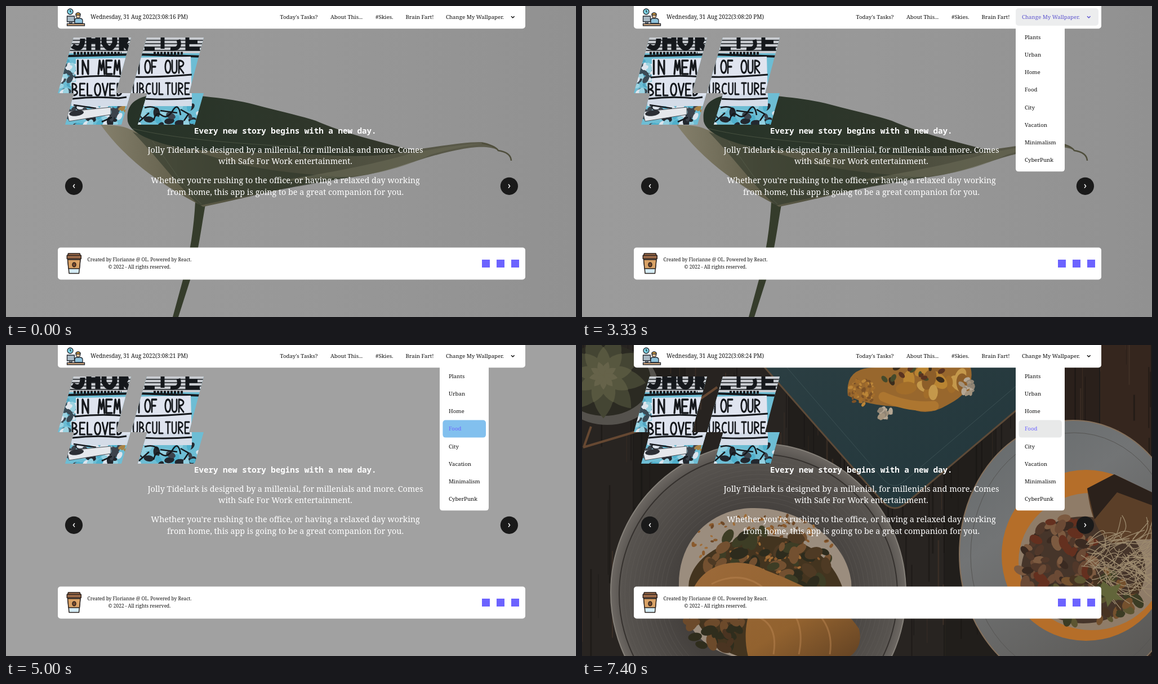
Recreate the animation shown at these times as an HTML page. Size 1012x553 px, loop 8000 ms.

```html
<!DOCTYPE html>
<html lang="en">
<head>
<meta charset="utf-8">
<title>Wallpaper menu</title>
<style>
html, body { margin: 0; width: 100%; height: 100%; overflow: hidden; background: #a1a1a1; }
svg { display: block; width: 1012px; height: 553px; }
text { font-family: "Noto Serif", serif; font-size: 9.7px; fill: #111; white-space: pre; }
.title { font: bold 14.2px "Noto Sans Mono", monospace; fill: #fff; }
.lead { font-size: 14.35px; fill: #fff; text-anchor: middle; }
.foot { font-size: 8.4px; text-anchor: middle; }
#clock { font-size: 9.9px; }
.ink { fill: none; stroke: #15181c; }
</style>
</head>
<body>
<svg viewBox="0 0 1012 553">
<defs>
  <linearGradient id="wall"><stop stop-color="#9b9b9b"/><stop offset=".5" stop-color="#989898"/><stop offset="1" stop-color="#919191"/></linearGradient>
  <linearGradient id="under"><stop stop-color="#85806c"/><stop offset=".2" stop-color="#625f4b"/><stop offset=".45" stop-color="#464838"/><stop offset="1" stop-color="#5d5c4c"/></linearGradient>
  <linearGradient id="top"><stop stop-color="#263227"/><stop offset=".4" stop-color="#2c362a"/><stop offset="1" stop-color="#34372b"/></linearGradient>
  <linearGradient id="slate" x2="1" y2="1"><stop stop-color="#2c3f43"/><stop offset="1" stop-color="#22363b"/></linearGradient>
  <radialGradient id="plate"><stop offset=".55" stop-color="#45413e"/><stop offset=".92" stop-color="#57534f"/><stop offset="1" stop-color="#6d6863"/></radialGradient>
  <linearGradient id="bowl" x2=".6" y2="1"><stop stop-color="#64696b"/><stop offset=".4" stop-color="#727475"/><stop offset="1" stop-color="#5b5956"/></linearGradient>
  <linearGradient id="fish" x2="1" y2="1"><stop stop-color="#9c6a3a"/><stop offset=".6" stop-color="#92622f"/><stop offset="1" stop-color="#5e3f22"/></linearGradient>
  <clipPath id="hash"><path d="M120 56H222L195 155H92zM250 56H351L325 155H222zM121 155H221L205 211H105zM251 155H351L335 211H234z"/></clipPath>
</defs>

<g id="plant">
  <path fill="url(#wall)" d="M0 0H1012V553H0z"/>
  <path fill="#353c2b" d="M336 348H355C347 390 342 440 327 487L306 553H296L314 487C327 440 334 390 336 348z"/>
  <path fill="url(#under)" d="M168 211C190 212 205 212 222 220C330 250 560 262 720 256C780 248 820 241 845 242C858 244 866 249 873 256C860 250 845 250 825 252C740 264 690 296 610 305C520 316 430 340 350 357C300 330 225 290 168 211z"/>
  <path fill="#2f372a" opacity=".6" d="M225 224C270 270 305 320 344 355C450 330 520 322 610 304C520 300 440 290 380 272z"/>
  <path fill="#6a6955" opacity=".6" d="M470 313C580 296 650 282 720 262Q790 247 845 245Q800 251 755 264C700 290 650 302 580 306z"/>
  <path fill="url(#top)" d="M216 205C212 170 235 156 290 157C330 158 395 163 440 175C480 186 520 194 550 204C600 226 660 241 725 257C650 272 590 266 500 262C400 258 330 262 270 242C245 234 220 222 216 205z"/>
  <path fill="none" stroke="#5d6450" opacity=".6" d="M225 218C330 244 520 252 720 258M260 240C290 280 320 330 347 352"/>
  <path fill="none" stroke="#4f4e3c" stroke-width="2.5" d="M845 244Q868 248 874 257Q896 260 897 275"/>
</g>

<g id="food">
  <path fill="#1e1b19" d="M0 0H1012V553H0z"/>
  <g id="planks"></g>
  <path fill="none" stroke="#664832" stroke-width="4" d="M3 182L16 145M2 182L150 138L240 75"/>
  <ellipse cx="45" cy="72" rx="90" ry="70" fill="#55524d"/>
  <ellipse cx="40" cy="62" rx="82" ry="64" fill="#2b2a22"/>
  <g id="succulent"></g>
  <path fill="url(#slate)" stroke="#5d4a38" stroke-width="3" d="M285 -5L535 280Q555 300 577 280L790 100V-5z"/>
  <path fill="none" stroke="#3b5053" d="M325 -5L538 242Q555 258 572 242L780 65"/>
  <path fill="#98672d" d="M472 90Q466 40 520 40H690Q700 80 650 106Q610 130 580 110Q510 110 472 90z"/>
  <path fill="none" stroke="#ad7630" stroke-width="17" stroke-linecap="round" d="M535 92Q580 112 625 108"/>
  <g id="squash"></g>
  <ellipse cx="313" cy="440" rx="262" ry="265" fill="url(#plate)" stroke="#858079" stroke-width="2"/>
  <ellipse cx="313" cy="443" rx="247" ry="249" fill="none" stroke="#35312e" stroke-width="2"/>
  <g id="rings" fill="none" stroke="#686460" opacity=".35"></g>
  <path fill="#9b8d7e" d="M172 430C170 345 230 292 300 290C390 287 470 350 478 420C484 510 420 560 320 560C220 560 175 500 172 430z"/>
  <path fill="#43341f" d="M190 420C200 375 250 350 300 342C380 330 440 370 462 430C470 500 420 556 320 560C230 560 182 480 190 420z"/>
  <g id="garnish"></g>
  <path fill="url(#fish)" d="M195 440C215 385 280 375 325 400C390 425 465 460 492 505C500 540 480 565 420 570H300C285 530 290 490 300 470C260 480 205 470 195 440z"/>
  <path fill="none" stroke="#b98450" stroke-width="3" opacity=".5" d="M230 425Q280 400 320 430M300 480Q350 490 340 550M345 450Q400 480 385 550M390 455Q450 490 440 550"/>
  <ellipse cx="872" cy="372" rx="202" ry="238" fill="url(#bowl)" stroke="#84705c" stroke-width="2"/>
  <ellipse cx="874" cy="374" rx="184" ry="218" fill="none" stroke="#565553"/>
  <ellipse cx="895" cy="374" rx="150" ry="152" fill="#b56e29"/>
  <ellipse cx="905" cy="385" rx="130" ry="122" fill="#8f7c68"/>
  <ellipse cx="890" cy="400" rx="110" ry="95" fill="#46352a"/>
  <g id="beans"></g>
  <path fill="#5b3f28" d="M897 255L945 230L1012 262V345L940 352Q905 330 897 255z"/>
  <path fill="#2b211b" d="M897 255L945 230L1012 262V285L950 262L910 310z"/>
  <g id="straw" fill="none" stroke="#9c8a6e" stroke-width="1.3"></g>
  <path fill="#62653a" d="M925 420l14 10 18-6-8 18 12 12-18-2-10 14-4-18-14-8z"/>
</g>

<g clip-path="url(#hash)">
  <path fill="#6dbdd4" d="M90 50H355V215H90z"/>
  <path fill="#c9ccd1" d="M90 56H355V84H90z"/>
  <path class="ink" stroke="#6b6d72" stroke-width="1.5" d="M90 61H355M90 67H355M90 73H355M90 79H355"/>
  <g id="scraps"></g>
  <path class="ink" stroke-width="9" d="M118 71Q136 82 136 58M147 50V79M147 62H163V50V78M174 50V66Q184 84 193 66V50M205 80V54Q220 58 208 66L220 78"/>
  <path class="ink" stroke="#46484d" stroke-width="7" d="M246 76H264M278 50V76M292 76Q312 78 306 60M344 76H322V50M322 64H340"/>
  <path class="ink" stroke="#23262a" stroke-width="4" d="M108 89L230 86L352 90"/>
  <path class="ink" stroke="#a5423c" stroke-width="5" stroke-dasharray="4 2" d="M120 84H205M262 84H316"/>
  <path fill="#dfe4ef" d="M124 94L328 90L330 166L116 170V135H124z"/>
  <path fill="#d4dce8" d="M116 158H218V178H116zM242 156H330V178H242z"/>
  <path class="ink" stroke-width="3" d="M122 127Q170 122 212 126M228 126Q270 127 330 122M118 165Q160 160 200 164L214 162M228 164Q280 168 330 164"/>
  <g id="graffiti" class="ink" stroke-linecap="round" stroke-linejoin="round"></g>
  <path class="ink" stroke-width="2.5" d="M246 181q15-5 24 4M262 204q4-18 14-10t20-8 14 8M274 186l30 4M310 184l14 8-8 12M120 176l40 6M236 206l18-16M170 206l18-8"/>
  <path fill="#e5e8ec" stroke="#50545a" d="M108 188L186 180V193L112 205z"/>
  <ellipse cx="125" cy="190.500" rx="13" ry="5" fill="#2c2f35" transform="rotate(-8 125 190)"/>
</g>

<text class="title" x="334" y="227">Every new story begins with a new day.</text>
<text class="lead" x="496" y="260.5">Jolly Tidelark is designed by a millenial, for millenials and more. Comes</text>
<text class="lead" x="496" y="281.3">with Safe For Work entertainment.</text>
<text class="lead" x="496" y="315">Whether you're rushing to the office, or having a relaxed day working</text>
<text class="lead" x="496" y="336">from home, this app is going to be a great companion for you.</text>
<g fill="#1a1a1a"><circle cx="120.5" cy="320.3" r="15.6"/><circle cx="893.4" cy="320.3" r="15.6"/></g>
<path fill="none" stroke="#fff" stroke-width="1.4" d="M122 317l-2.6 3.3 2.6 3.3M892 317l2.6 3.3-2.6 3.3"/>

<rect x="92" y="-8" width="830" height="48.3" rx="5" fill="#fff"/>
<g stroke="#20262e" stroke-width="1.3">
  <circle cx="114" cy="10" r="5" fill="#7fd6e8"/>
  <path fill="none" d="M114 7v3l2 1"/>
  <path fill="#8fc3dc" d="M122 31V26q0-4 4-4h5q5 0 5 4v5z"/>
  <path fill="#f0c49c" d="M124.500 15v4q3.500 5 7 0v-4z"/>
  <path fill="#e6a83f" d="M124 16v-2q4-4 8 0v2z"/>
  <path fill="#a9b9c4" d="M108.500 18h13v10h-13zM113 28v3h4v-3z"/>
  <path fill="#e0b183" d="M108.500 31.500h31v3.500h-31z"/>
</g>
<text id="clock" x="150" y="22.7"></text>
<text x="486.5" y="22.7">Today's Tasks?</text>
<text x="576" y="22.7">About This...</text>
<text x="656" y="22.7">#Skies.</text>
<text x="709.5" y="22.7">Brain Fart!</text>
<rect id="headBox" x="770" y="4" width="147" height="31" rx="5" fill="#ecedee"/>
<text id="head" x="781" y="22.7">Change My Wallpaper.</text>
<path id="arrow" fill="none" stroke-width="1.5" d="M897 18.2l2.8 2.8 2.8-2.8"/>
<g id="menu"><path fill="#fff" d="M770 40H857V289Q857 294.3 852 294.3H775Q770 294.3 770 289z"/></g>

<rect x="92" y="429.4" width="830" height="57" rx="5" fill="#fff"/>
<g stroke="#2a211d" stroke-width="1.5" stroke-linejoin="round">
  <path fill="#d5ecf6" d="M109.5 449H132L129.5 475.5H112z"/>
  <path fill="#d9a266" d="M109.5 451H132L130.5 467H111z"/>
  <path fill="#9b6a48" d="M108.300 443.5H133.300V449.5H108.300zM110.5 440H131L132 443.5H109.5z"/>
  <ellipse cx="121" cy="460" rx="3" ry="3.8" fill="#7a4a2c"/>
</g>
<text class="foot" x="237" y="454.3">Created by Florianne @ OL. Powered by React.</text>
<text class="foot" x="237" y="467.3">© 2022 - All rights reserved.</text>
<path fill="#6c63ff" d="M845 451h14v14h-14zM871 451h14v14h-14zM897 451h14v14h-14z"/>
</svg>

<script>
const $ = id => document.getElementById(id);
let seed = 7;
const rand = (a = 0, b = 1) => {
  seed = (seed * 16807) % 2147483647;
  return a + (b - a) * seed / 2147483647;
};

function add(parent, tag, attrs) {
  const node = document.createElementNS('http://www.w3.org/2000/svg', tag);
  for (const k in attrs) node.setAttribute(k, attrs[k]);
  return parent.appendChild(node);
}

// Scatter ellipses of mixed size and colour inside an elliptical area.
function scatter(id, count, [cx, cy, rx, ry], size, colors) {
  for (let i = 0; i < count; i++) {
    const a = rand(0, 6.283), d = Math.sqrt(rand()), r = rand(size * .6, size * 1.2);
    const x = cx + rx * d * Math.cos(a), y = cy + ry * d * Math.sin(a);
    add($(id), 'ellipse', { cx: x, cy: y, rx: r, ry: r * .6, fill: colors[i % colors.length],
      transform: `rotate(${rand(0, 180)} ${x} ${y})` });
  }
}

for (let x = 0, i = 0; x < 1012; x += 92, i++) {
  const fill = x > 780 ? ['#35261e', '#2a201b'][i % 2] : ['#282421', '#211e1b', '#272320'][i % 3];
  add($('planks'), 'rect', { x, y: 0, width: 90, height: 553, fill });
}
for (let i = 0; i < 160; i++)
  add($('planks'), 'rect', { x: rand(0, 1012), y: rand(-80, 500), width: rand(.5, 3), height: rand(40, 200),
    fill: i % 3 ? '#141210' : '#4a382d', opacity: .5 });

for (let ring = 3; ring > 0; ring--)
  for (let i = 0; i < 9; i++)
    add($('succulent'), 'path', { d: 'M0 0Q-14 -14 0 -30Q14 -14 0 0', fill: ['#66634a', '#57573f', '#444533'][ring - 1],
      transform: `translate(38 54) rotate(${i * 40 + ring * 20}) scale(${ring * .85})` });

for (let r = 165; r < 245; r += 8) add($('rings'), 'circle', { cx: 313, cy: 443, r });

scatter('squash', 60, [498, 82, 24, 24], 4, ['#a36d2c', '#7d5227', '#bb8538']);
scatter('squash', 16, [625, 64, 58, 26], 17, ['#b98432', '#8d5e29', '#c4984b', '#a26d2a']);
scatter('squash', 14, [590, 55, 65, 20], 7, ['#454a2b', '#5a3320', '#3a2c1c']);
for (const spot of [[537, 120, 12, 10], [684, 75, 13, 15]])
  scatter('squash', 18, spot, 6, ['#b5a794', '#8f8474', '#a3937d']);
scatter('garnish', 130, [320, 355, 125, 55], 4, ['#8a5a2d', '#a06c36', '#6e4827']);
scatter('garnish', 70, [330, 385, 118, 58], 14, ['#3d3d25', '#4e3a24', '#2d2b1d', '#735030']);
scatter('garnish', 40, [240, 500, 48, 45], 13, ['#4a3421', '#2f2d1d', '#6c4a2b']);
scatter('beans', 85, [845, 385, 68, 80], 12, ['#51382a', '#6b4a35', '#3a2a21', '#7c5a40', '#64301f']);
scatter('beans', 60, [910, 450, 80, 50], 12, ['#473322', '#5c5531', '#75512e', '#3c3c24']);
for (let i = 0; i < 90; i++) {
  const x = rand(885, 990), y = rand(345, 430);
  add($('straw'), 'path', { d: `M${x} ${y}q${rand(10, 50)} ${rand(-40, 40)} ${rand(20, 80)} ${rand(-50, 60)}` });
}
scatter('scraps', 40, [105, 125, 20, 30], 8, ['#9bd3e2', '#4fa6c2', '#dfe6ee', '#3a4a55']);
scatter('scraps', 90, [220, 195, 130, 28], 9, ['#4fb0cc', '#23282f', '#dbe3ec', '#93cfe0', '#3c434c']);
scatter('scraps', 5, [215, 192, 40, 12], 5, ['#a88347']);

// Brush lettering, each letter in a 10 by 20 box.
const glyphs = {
  I: 'M5 0V20', N: 'M0 20V0L9 20V0', M: 'M0 20L2 0 5 14 8 0 10 20', E: 'M9 0H0V20H9M0 10H7',
  O: 'M5 0C-2 0-2 20 5 20S12 0 5 0', F: 'M9 0H0V20M0 10H7', U: 'M0 0V14C0 22 9 22 9 14V0',
  R: 'M0 20V0C12 0 12 10 0 10L9 20', B: 'M0 0V20C13 20 11 10 0 10 11 10 9 0 0 0', L: 'M0 0V20H8',
  V: 'M0 0L5 20 10 0', D: 'M0 0V20C12 20 12 0 0 0', C: 'M9 2C-3-4-3 24 9 18', T: 'M0 0H10M5 0V20'
};
function brush(word, x, y, step, sx, sy) {
  [...word].forEach((c, i) => glyphs[c] && add($('graffiti'), 'path', {
    d: glyphs[c], 'stroke-width': 3, transform: `translate(${x + i * step} ${y}) scale(${sx} ${sy})` }));
}
brush('IN MEM', 122, 97, 14, 1.1, 1.2);
brush('I', 231, 98, 0, 1, 1.1);
brush('OF OUR', 247, 97, 12, .9, 1.1);
brush('BELOVED', 118, 138, 13.3, .95, 1.05);
brush('UBCULTURE', 226, 137, 11.5, .8, 1);

const items = ['Plants', 'Urban', 'Home', 'Food', 'City', 'Vacation', 'Minimalism', 'CyberPunk'].map((name, i) => {
  const y = 133.6 + (i - 3) * 31.1;
  const box = add($('menu'), 'rect', { x: 775.4, y, width: 76.6, height: 31, rx: 5 });
  const label = add($('menu'), 'text', { x: 786, y: y + 18.8 });
  label.textContent = name;
  return { box, label };
});

// When the pointer enters each item in turn.
const enter = [3430, 3600, 3790, 4000];
const ticks = [330, 1330, 2330, 3330, 4400, 5800, 6330, 7400];

const ramp = (t, a, b) => {
  const p = Math.min(1, Math.max(0, (t - a) / (b - a)));
  return p * p * (3 - 2 * p);
};
const fade = (t, start) => start === undefined ? 0 : ramp(t, start, start + 200);
const mix = (a, b, p) => `rgb(${a.map((v, i) => Math.round(v + (b[i] - v) * p))})`;
const black = [17, 17, 17], violet = [108, 99, 255], indigo = [94, 86, 207];
const hoverGrey = [232, 233, 233], pressBlue = [130, 192, 238];

function draw(t) {
  $('clock').textContent = `Wednesday, 31 Aug 2022(3:08:${16 + ticks.filter(k => k <= t).length} PM)`;

  $('plant').style.opacity = 1 - ramp(t, 4430, 4970);
  $('food').style.display = t >= 7000 ? '' : 'none';
  $('menu').style.display = t >= 1870 ? '' : 'none';

  const head = fade(t, 1870) - fade(t, 3340);
  $('headBox').style.opacity = head;
  $('head').style.fill = $('arrow').style.stroke = mix(black, indigo, head);

  const press = fade(t, 4400) - ramp(t, 5790, 5940);
  items.forEach(({ box, label }, i) => {
    const over = fade(t, enter[i]) - fade(t, enter[i + 1]);
    box.style.opacity = over;
    box.style.fill = mix(hoverGrey, pressBlue, press);
    label.style.fill = mix(black, violet, over);
  });
}

let begin;
function loop(now) {
  begin ??= now;
  draw((now - begin) % 8000);
  requestAnimationFrame(loop);
}
draw(0);
requestAnimationFrame(loop);
</script>
</body>
</html>
```
